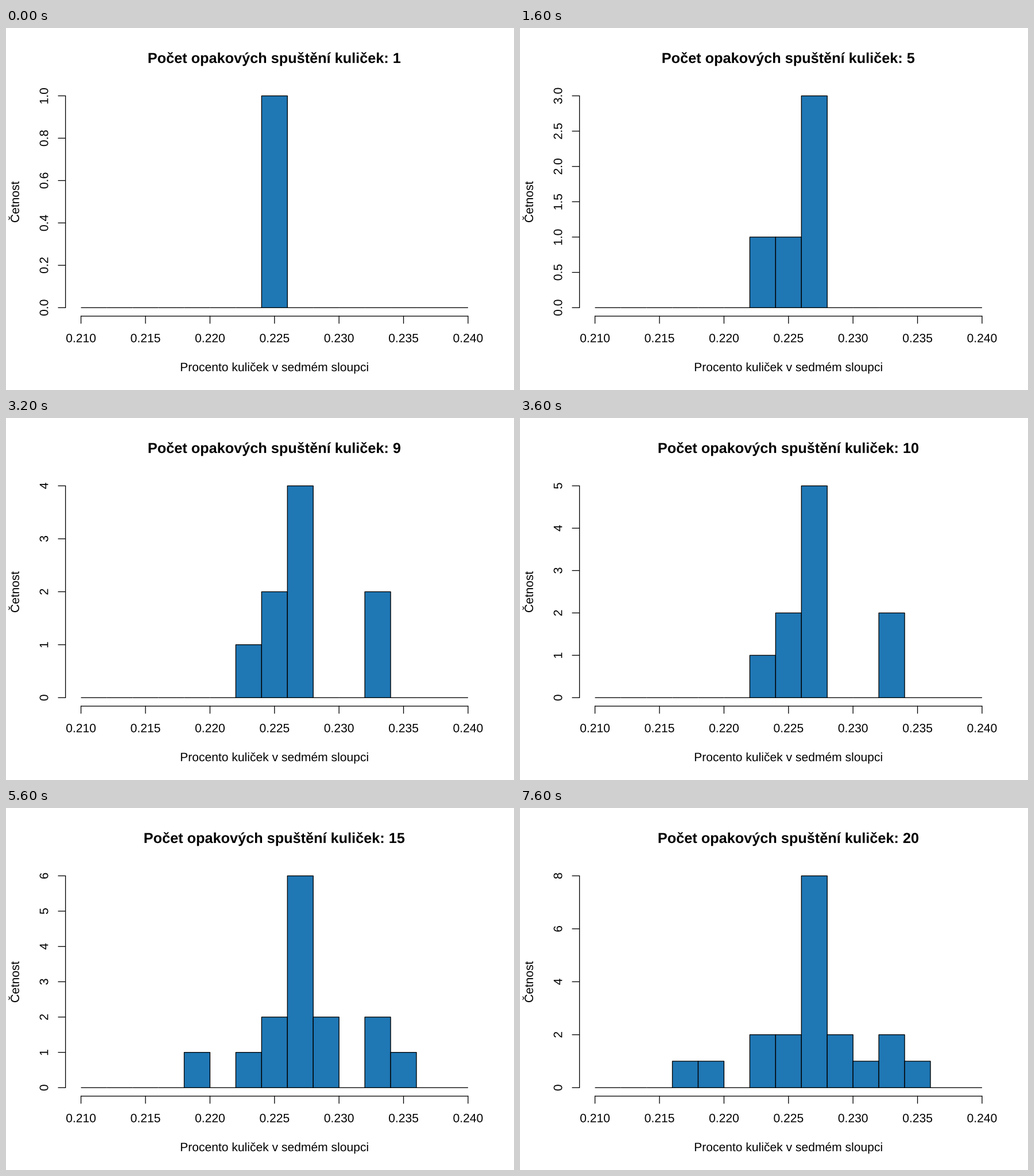
Recreate the animation shown at these times as a matplotlib script. Size 885 by 632 pixels, loop 8000 ms.

```python
import matplotlib.pyplot as plt
from matplotlib.animation import FuncAnimation
from matplotlib.patches import PathPatch, Rectangle
from matplotlib.textpath import TextPath
from matplotlib.transforms import Affine2D

W, H, DPI = 885, 632, 64
INCH = H / 5                       # the chart is laid out as 7 x 5 inches
LINE = INCH / 5                    # height of one margin line
FONT = INCH / 6
TITLE_FONT = 1.2 * FONT
STROKE = INCH / 96 * 72 / DPI
TICK = LINE / 2
LEFT, RIGHT = 4.1 * LINE, W - 2.1 * LINE
TOP, BOTTOM = 4.1 * LINE, H - 5.1 * LINE
PAD_X, PAD_Y = (RIGHT - LEFT) * 0.04 / 1.08, (BOTTOM - TOP) * 0.04 / 1.08
X0, X1 = LEFT + PAD_X, RIGHT - PAD_X
Y0, Y1 = BOTTOM - PAD_Y, TOP + PAD_Y
MID_X, MID_Y = (LEFT + RIGHT) / 2, (TOP + BOTTOM) / 2
BINS = 15
BIN_W = (X1 - X0) / BINS

# Histogram bin hit by each successive run
HITS = [7, 8, 8, 6, 8, 11, 7, 8, 11, 8, 4, 12, 8, 9, 9, 3, 6, 8, 10, 8]
TICK_STEPS = {1: 0.2, 2: 0.5, 3: 0.5, 8: 2}

fig = plt.figure(figsize=(W / DPI, H / DPI), dpi=DPI, facecolor="white")
ax = fig.add_axes([0, 0, 1, 1])


def line(xs, ys):
    ax.plot(xs, ys, color="black", lw=STROKE, solid_capstyle="round", snap=False)


def label(x, y, text, size=FONT, weight="normal", angle=0):
    """Draw text as outlines, centred on x along its baseline at y."""
    path = TextPath((0, 0), text, size=size,
                    prop={"family": "Liberation Sans", "weight": weight})
    box = path.get_extents()
    place = (Affine2D().translate(-(box.x0 + box.x1) / 2, 0).scale(1, -1)
             .rotate_deg(-angle).translate(x, y))
    ax.add_patch(PathPatch(place.transform_path(path), facecolor="black",
                           lw=0, snap=False))


def draw_x_axis():
    line([X0, X1], [BOTTOM, BOTTOM])
    for i in range(7):
        x = X0 + (X1 - X0) * i / 6
        line([x, x], [BOTTOM, BOTTOM + TICK])
        label(x, BOTTOM + 1.8 * LINE, f"{0.21 + 0.005 * i:.3f}")
    label(MID_X, BOTTOM + 3.8 * LINE, "Procento kuliček v sedmém sloupci")


def draw_y_axis(peak):
    step = TICK_STEPS.get(peak, 1)
    line([LEFT, LEFT], [Y0, Y1])
    for i in range(round(peak / step) + 1):
        value = i * step
        y = Y0 + (Y1 - Y0) * value / peak
        line([LEFT, LEFT - TICK], [y, y])
        text = f"{value:.1f}" if step < 1 else str(value)
        label(LEFT - 1.2 * LINE, y, text, angle=90)
    label(LEFT - 3.2 * LINE, MID_Y, "Četnost", angle=90)


def draw_bars(counts, peak):
    for i, count in enumerate(counts):
        ax.add_patch(Rectangle(
            (X0 + i * BIN_W, Y0), BIN_W, (Y1 - Y0) * count / peak,
            facecolor="#1f77b4", edgecolor="black", lw=STROKE,
            joinstyle="round", snap=False, zorder=2))


def update(frame):
    ax.clear()
    ax.set(xlim=(0, W), ylim=(H, 0))
    ax.axis("off")
    runs = HITS[:frame + 1]
    counts = [runs.count(i) for i in range(BINS)]
    peak = max(counts)
    label(MID_X, TOP / 2 + 0.365 * TITLE_FONT,
          f"Počet opakových spuštění kuliček: {len(runs)}",
          size=TITLE_FONT, weight="bold")
    draw_bars(counts, peak)
    draw_x_axis()
    draw_y_axis(peak)
    return []


anim = FuncAnimation(fig, update, frames=len(HITS), interval=400,
                     repeat=True, repeat_delay=0, init_func=lambda: update(0))
plt.show()
```
